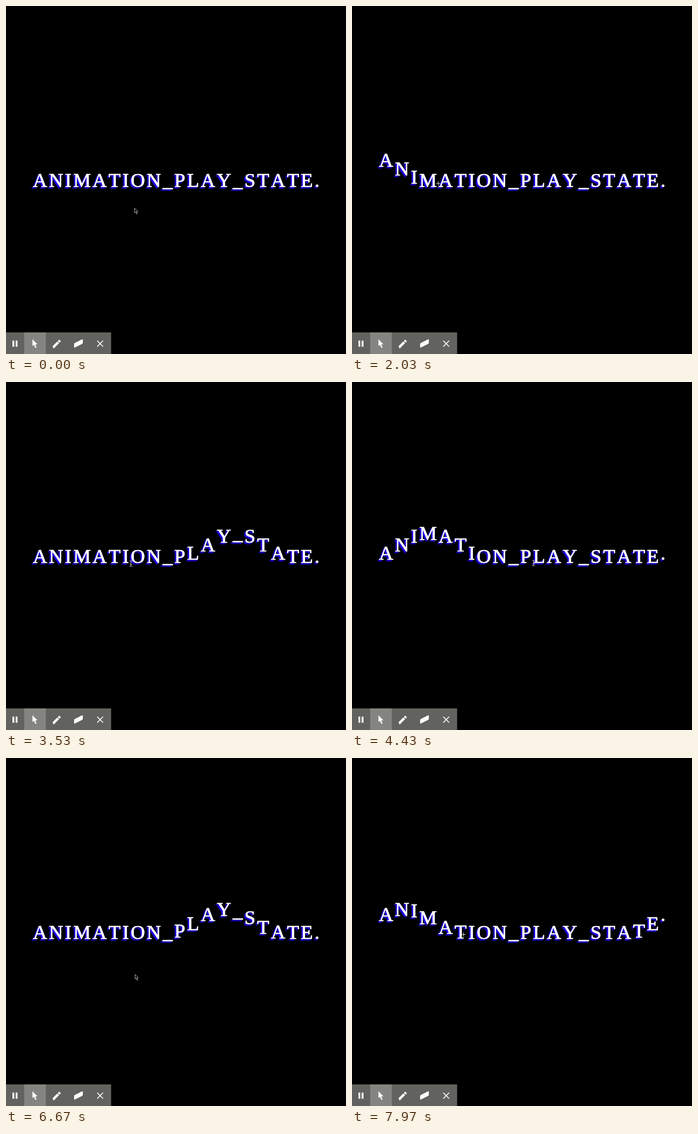
Recreate the animation shown at these times as an HTML page with a canvas. Size 739 px wide and 758 px high, loop 8000 ms.

```html
<!DOCTYPE html>
<html lang="en">
<head>
<meta charset="utf-8">
<title>Wave text</title>
<style>
  html, body { margin: 0; width: 100%; height: 100%; overflow: hidden; background: #000; }
  canvas { display: block; width: 739px; height: 758px; }
</style>
</head>
<body>
<canvas id="stage" width="739" height="758"></canvas>
<script>
const ctx = document.getElementById('stage').getContext('2d');
const LOOP = 8000;
const TEXT = 'ANIMATION_PLAY_STATE.';
const FONT = '43px "Liberation Serif", "Times New Roman", serif';
const LEFT = 58.5, BASELINE = 393.8, SPACING = 3.74;
const PERIOD = 2000, HALF = 400, STAGGER = 100, LIFT = 50;

// The wave only advances while the pointer is over the text.
const RUNS = [[1730, 5330], [6500, 6630], [7170, LOOP]];

// Key pointer stops: time, x, y
const STOPS = [
  [0, 279, 440], [700, 655, 252], [1300, 672, 385], [1700, 597, 409],
  [2030, 187, 386], [3530, 271, 395], [4430, 394, 394], [5030, 461, 384],
  [5750, 610, 560], [6560, 310, 394], [6670, 280, 471], [7970, 242, 384]
];

const clamp = (v, lo, hi) => Math.min(hi, Math.max(lo, v));
const smooth = k => k * k * (3 - 2 * k);

// CSS ease-in-out: cubic-bezier(.42, 0, .58, 1)
function easeInOut(x) {
  let u = x;
  for (let i = 0; i < 5; i++) {
    const v = 1 - u;
    const error = 1.26 * u * v * v + 1.74 * u * u * v + u ** 3 - x;
    u -= error / (1.26 * v * v + 0.96 * u * v + 1.26 * u * u);
  }
  return smooth(u);
}

function lift(time) {
  if (time <= 0) return 0;
  const distance = Math.abs(time % PERIOD - HALF) / HALF;
  return LIFT * easeInOut(clamp(1 - distance, 0, 1));
}

const runTime = t => RUNS.reduce((sum, [a, b]) => sum + clamp(t - a, 0, b - a), 0);
const isOver = t => RUNS.some(([a, b]) => t >= a && t < b);

function pointerAt(t) {
  const next = STOPS.findIndex(stop => stop[0] > t);
  if (next < 0) return STOPS[STOPS.length - 1].slice(1);
  const [t0, x0, y0] = STOPS[next - 1], [t1, x1, y1] = STOPS[next];
  const k = smooth((t - t0) / (t1 - t0));
  return [x0 + (x1 - x0) * k, y0 + (y1 - y0) * k];
}

function drawLetters(time) {
  let x = LEFT;
  [...TEXT].forEach((ch, i) => {
    const y = BASELINE - lift(time - i * STAGGER);
    ctx.strokeText(ch, x, y);
    ctx.fillText(ch, x, y);
    x += ctx.measureText(ch).width + SPACING;
  });
}

function drawText(time) {
  ctx.save();
  ctx.font = FONT;
  ctx.fillStyle = ctx.strokeStyle = '#fff';
  ctx.lineWidth = 0.7;
  ctx.lineJoin = 'round';
  ctx.shadowColor = '#2200ff';
  ctx.shadowOffsetX = -3;
  ctx.shadowOffsetY = 3;
  ctx.shadowBlur = 2;
  drawLetters(time);
  // A second pass keeps the faces white where shadows overlap them.
  ctx.shadowColor = 'transparent';
  drawLetters(time);
  ctx.restore();
}

function at(x, y, paint, angle = 0) {
  ctx.save();
  ctx.translate(x, y);
  ctx.rotate(angle);
  paint();
  ctx.restore();
}

function bar(w, h, x = 0, y = 0) {
  ctx.fillRect(x - w / 2, y - h / 2, w, h);
}

function arrow(scale) {
  ctx.scale(scale, scale);
  ctx.beginPath();
  ctx.moveTo(0, 0);
  ctx.lineTo(0, 10);
  ctx.lineTo(2.3, 8.2);
  ctx.lineTo(4.4, 13);
  ctx.lineTo(6.2, 12.2);
  ctx.lineTo(4.2, 7.6);
  ctx.lineTo(7.4, 7.4);
  ctx.closePath();
  ctx.fill();
}

function eraser() {
  ctx.transform(1, -0.5, 0, 1, 0, 0);
  ctx.beginPath();
  ctx.roundRect(-9.5, -5, 19, 10, 2);
  ctx.fill();
}

function pencil() {
  bar(15, 5.4, -2.5);
  bar(4, 5.4, 8.6);
  ctx.beginPath();
  ctx.moveTo(-9.5, -2.7);
  ctx.lineTo(-12, 2.7);
  ctx.lineTo(-9.5, 2.7);
  ctx.fill();
}

function drawPointer(x, y, over) {
  at(Math.round(x) + 0.5, Math.round(y) + 0.5, () => {
    if (!over) {
      ctx.fillStyle = '#000';
      ctx.strokeStyle = '#d0d0d0';
      arrow(0.95);
      ctx.lineWidth = 1;
      ctx.stroke();
    } else if (y < 390) {
      ctx.fillStyle = '#e8e8e8';
      bar(9, 1);
      bar(1, 9);
    } else {
      ctx.fillStyle = '#b8b8b8';
      bar(1.4, 13);
      bar(6, 1, 0, -6);
      bar(6, 1, 0, 6);
      bar(4, 1, 0, 2);
    }
  });
}

function drawToolbar() {
  ctx.fillStyle = '#62625e';
  ctx.fillRect(0, 711, 228.5, 47);
  ctx.fillStyle = '#848480';
  ctx.fillRect(39.5, 711, 47, 47);

  ctx.fillStyle = '#fff';
  bar(4, 13.5, 16, 735.5);
  bar(4, 13.5, 23, 735.5);
  at(57.5, 726, () => arrow(1.45));
  at(110, 736, pencil, -Math.PI / 4);
  at(157.5, 735, eraser);
  for (const turn of [-1, 1]) at(204.7, 735.5, () => bar(18, 2), turn * Math.PI / 4);
}

function draw(t) {
  ctx.fillStyle = '#000';
  ctx.fillRect(0, 0, 739, 758);
  drawText(runTime(t));
  drawToolbar();
  drawPointer(...pointerAt(t), isOver(t));
}

const start = performance.now();
function tick() {
  draw((performance.now() - start) % LOOP);
  requestAnimationFrame(tick);
}
tick();
</script>
</body>
</html>
```
